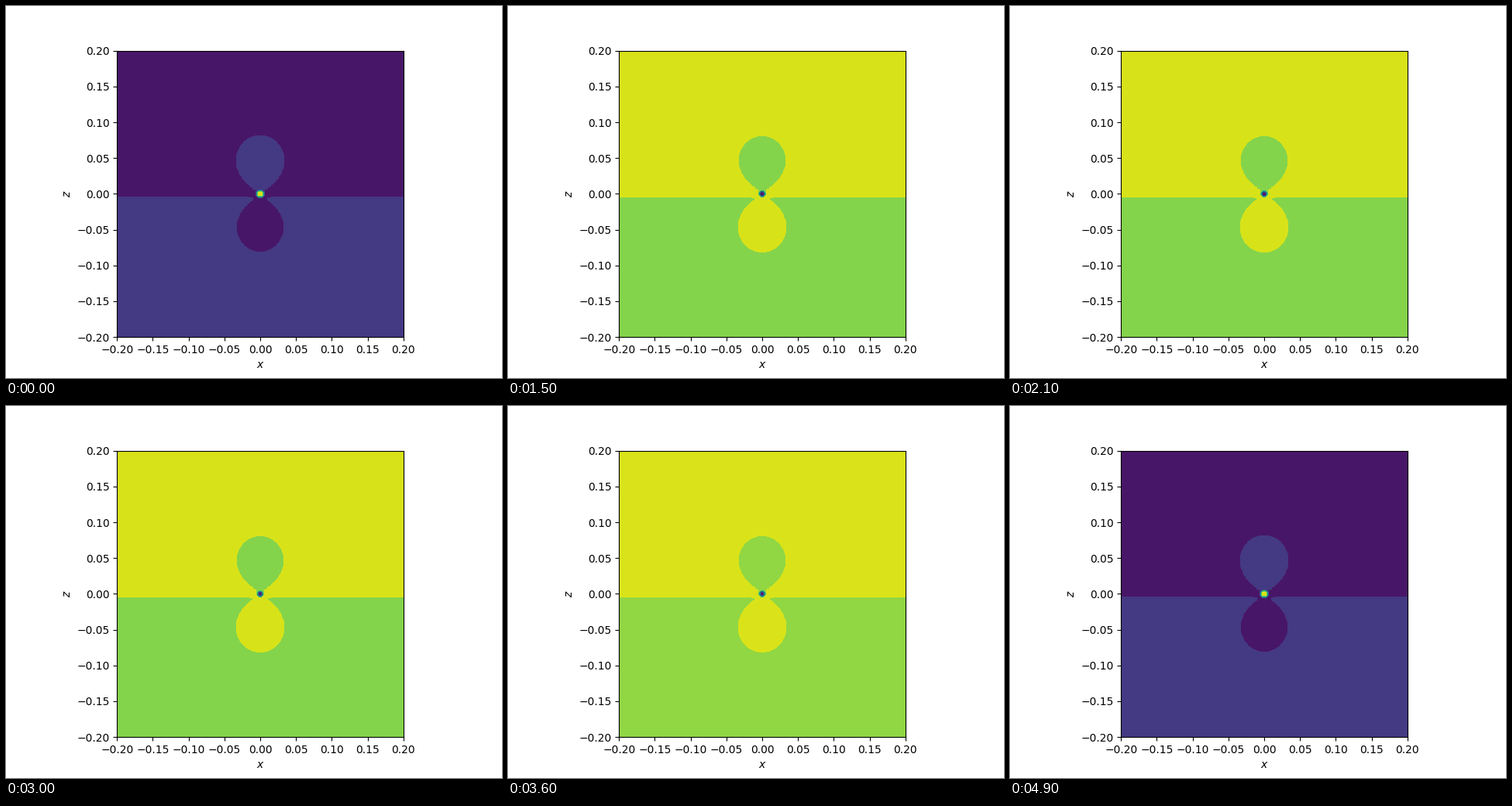
Write a matplotlib script that moves like this. It is 640 px wide and 480 px high and loops after 5 s.

```python
import numpy as np
import matplotlib.pyplot as plt
from matplotlib.animation import ArtistAnimation

FRAMES = 50
INTERVAL = 100
HALF = 0.2          # half width of the field of view
POINTS = 100        # grid points along each axis
LOBE = 0.0811       # height of the lobes above the centre

axis = np.linspace(-HALF, HALF, POINTS)
step = axis[1] - axis[0]
x, z = np.meshgrid(axis, axis)
r2 = x**2 + z**2

# Dipole-like angular term with a lobed zero line; sign flips just below z = 0
side = np.where(z > -step, 1, -1)
field = side * (3 * z**2 / r2 - 1 - 2 * r2 / LOBE**2) / r2**4
field /= field.max()


def strength(i):
    """Oscillating peak value, slightly stronger in the negative half."""
    swing = np.cos(2 * np.pi * i / FRAMES)
    return swing * (11.18 if swing > 0 else 11.21)


fig, ax = plt.subplots(figsize=(6.4, 4.8), dpi=100)
ax.set_aspect("equal")
ax.set_xlabel("$x$")
ax.set_ylabel("$z$")

scenes = [[ax.contourf(x, z, strength(i) * field)] for i in range(FRAMES)]
anim = ArtistAnimation(fig, scenes, interval=INTERVAL, repeat=True,
                       repeat_delay=0, blit=False)

plt.show()
```
